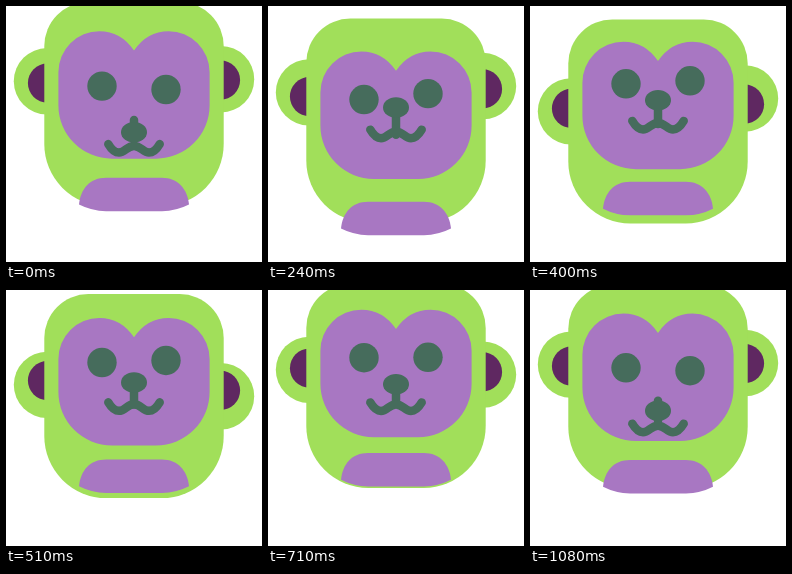
Animation of 256x256 px, one loop 1110 ms. Source, as an HTML page with a canvas:

```html
<!DOCTYPE html>
<html lang="en">
<head>
<meta charset="utf-8">
<title>Bouncing monkey</title>
<style>
html, body { margin: 0; width: 100%; height: 100%; overflow: hidden; background: #fff; }
canvas { display: block; width: 256px; height: 256px; }
</style>
</head>
<body>
<canvas id="stage" width="256" height="256"></canvas>
<script>
const ctx = document.getElementById('stage').getContext('2d');

const LOOP = 1110;
const STEPS = 33;
const STEP_MS = 33.75;
const DROP = 34;
const STAGGER = 1 / 24; // share of the loop between neighbouring parts

const GREEN = '#a1df5a';
const PURPLE = '#a877c2';
const DARK = '#466c5c';
const PLUM = '#5f2861';

function disc(x, y, rx, ry, color) {
  ctx.fillStyle = color;
  ctx.beginPath();
  ctx.ellipse(x, y, rx, ry, 0, 0, Math.PI * 2);
  ctx.fill();
}

function fillPath(color, d) {
  ctx.fillStyle = color;
  ctx.fill(new Path2D(d));
}

function strokePath(d) {
  ctx.strokeStyle = DARK;
  ctx.lineWidth = 8.5;
  ctx.lineCap = ctx.lineJoin = 'round';
  ctx.stroke(new Path2D(d));
}

const ear = x => () => disc(x, 0, 33.2, 33.2, GREEN);
const innerEar = x => () => disc(x, 0, 19.6, 19.6, PLUM);
const eye = x => () => disc(x, 0, 14.7, 14.7, DARK);

function head() {
  ctx.fillStyle = GREEN;
  ctx.beginPath();
  ctx.roundRect(38.3, 0, 179.4, 204, [44, 44, 62, 62]);
  ctx.fill();
}

function face() {
  fillPath(PURPLE, 'M52.4 41A41 41 0 0 1 93.4 0Q115 0 128 19.4Q141 0 162.6 0' +
    'A41 41 0 0 1 203.6 41V74A53.5 53.5 0 0 1 150 127.5H106A53.5 53.5 0 0 1 52.4 74Z');
}

function belly() {
  fillPath(PURPLE, 'M73 26.8C74.500 11 84 0 100 0H156C171.500 0 181.500 11 183 26.8' +
    'A62 62 0 0 1 156 33.5H100A62 62 0 0 1 73 26.8Z');
}

function mouth() {
  strokePath('M102.300 0C105.500 5.500 109.500 8.500 113 8.500C119 8.500 121 2 128 2' +
    'C135 2 137 8.500 143 8.500C146.500 8.500 150.500 5.500 153.700 0');
}

const stem = () => strokePath('M128 0V19.500');
const nose = () => disc(128, 0, 13, 10.2, DARK);

// Back to front: drawing, highest position, place in the falling order
const parts = [
  [ear(215), 73, 11],
  [innerEar(214.5), 73.3, 10],
  [ear(41), 73.6, 9],
  [innerEar(41.5), 74, 8],
  [head, -8.7, 7],
  [face, 18.3, 6],
  [belly, 162.4, 5],
  [eye(96), 67.6, 4],
  [eye(160), 67.3, 3],
  [stem, 93.3, 2],
  [mouth, 111.5, 1],
  [nose, 92.3, 0]
];

// Soft at the top of the jump, a sharp rebound at the bottom
function fall(phase) {
  const x = Math.abs(2 * (phase - Math.floor(phase)) - 1);
  return DROP * (0.8 * x ** 2 + 0.2 * x ** 7);
}

function draw(ms) {
  const step = Math.min(STEPS - 1, Math.floor((ms % LOOP + 5) / STEP_MS));
  ctx.fillStyle = '#fff';
  ctx.fillRect(0, 0, 256, 256);
  for (const [paint, top, order] of parts) {
    ctx.save();
    ctx.translate(0, top + fall(step / STEPS - order * STAGGER));
    paint();
    ctx.restore();
  }
}

const start = performance.now();

function tick() {
  draw(performance.now() - start);
  requestAnimationFrame(tick);
}

tick();
</script>
</body>
</html>
```
